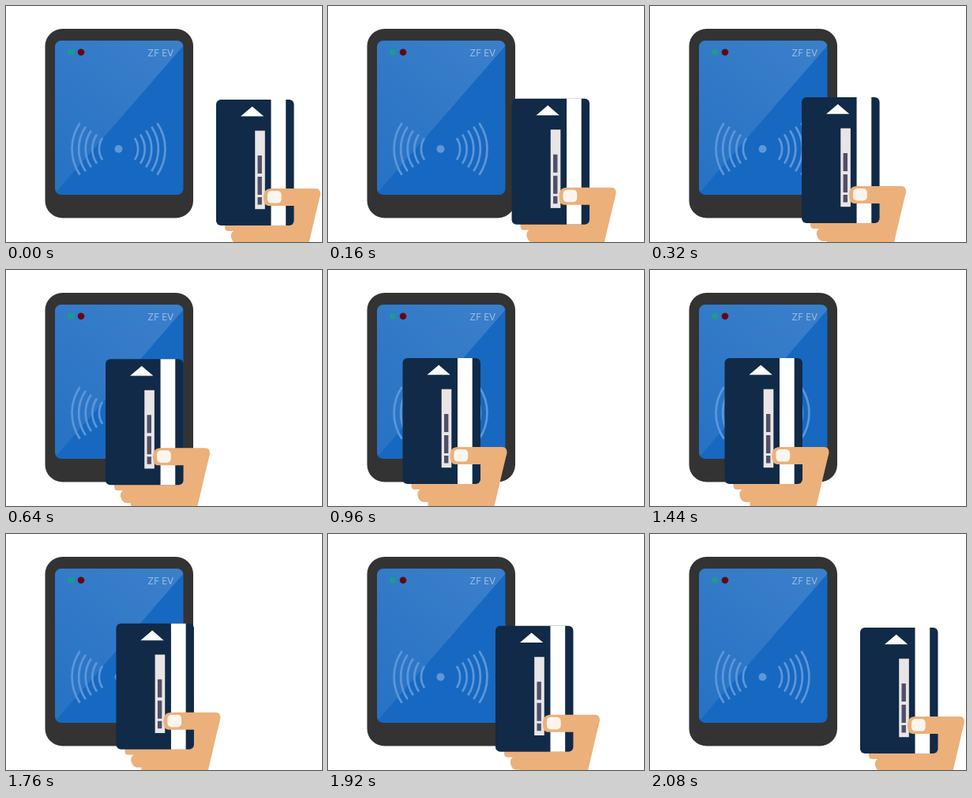
An HTML page for the animation above (3.76 s loop, 400 by 300 pixels).

```html
<!DOCTYPE html>
<html lang="en">
<head>
<meta charset="utf-8">
<title>Card reader</title>
<style>
  html, body { margin: 0; width: 100%; height: 100%; overflow: hidden; background: #fff; }
  svg { display: block; width: 400px; height: 300px; }
  .label { font: 13px "Open Sans", "Noto Sans", sans-serif; fill: #fff; fill-opacity: .5; text-anchor: end; }
  .skin { fill: #ecb07a; }
  #waves { fill: none; stroke: #5c97da; stroke-width: 2.7; }
</style>
</head>
<body>
<svg viewBox="0 0 400 300">
  <defs>
    <linearGradient id="shine" gradientUnits="userSpaceOnUse" x1="200" y1="50" x2="70" y2="225">
      <stop offset="0" stop-color="#fff" stop-opacity=".15"/>
      <stop offset="1" stop-color="#fff" stop-opacity=".07"/>
    </linearGradient>
    <clipPath id="panel"><rect x="62" y="44" width="162.5" height="196" rx="8"/></clipPath>
  </defs>

  <rect x="49.5" y="29" width="187.5" height="240.5" rx="22" fill="#333"/>
  <g clip-path="url(#panel)">
    <rect x="62" y="44" width="163" height="196" fill="#1768c0"/>
    <path d="M62 44H225V50L62 238Z" fill="url(#shine)"/>
    <rect id="flash" x="62" y="44" width="163" height="196" fill="#fff" opacity="0"/>
  </g>
  <circle id="led" cx="82" cy="58.7" r="4" fill="#1f9a8c"/>
  <circle cx="95" cy="58.7" r="4.3" fill="#680610"/>
  <text class="label" x="212" y="63.5">ZF EV</text>
  <path id="waves"/>
  <circle cx="142.5" cy="181.7" r="5" fill="#5c97da"/>

  <g id="card">
    <path class="skin" d="M277 274V281Q277 286 281 286H288Q284 289 285 294Q287 302 293 302H298V320H379L398 239L360 236V274Z"/>
    <rect x="266" y="119" width="98.5" height="160" rx="6" fill="#102a48"/>
    <rect x="335.5" y="119" width="18.7" height="160" fill="#fff"/>
    <path d="M297 140.3L311.7 127.7L326.3 140.3Z" fill="#fff"/>
    <rect x="315.2" y="158.5" width="12.6" height="99.7" fill="#e9e5e6"/>
    <path d="M318.5 190h5.4v23h-5.4zM318.5 217h5.4v23h-5.4zM318.5 243h5.4v9.5h-5.4z" fill="#4f5067"/>
    <path class="skin" d="M336 232H392Q398 232 398 239L394 254H332Q326 254 326 243Q326 232 336 232Z"/>
    <rect x="331" y="235" width="17.7" height="15.6" rx="5" fill="#fcf5ed"/>
  </g>
</svg>
<script>
  const TICK = 80, TICKS = 47;
  const SHIFT = { x: -171.5, y: -7 };
  // Share of the way travelled after each tick of the approach
  const ease = [0, .085, .195, .315, .431, .543, .646, .738, .816, .881, .934, .974, 1];
  const LAST = ease.length - 1;
  const byId = id => document.getElementById(id);
  const card = byId('card'), flash = byId('flash'), led = byId('led');

  function arcs(cx, cy) {
    const angle = 34 * Math.PI / 180;
    let d = '';
    for (const side of [-1, 1]) {
      for (let i = 0; i < 5; i++) {
        const r = 59 - 8.6 * i;
        const x = cx + side * r * Math.cos(angle), h = r * Math.sin(angle);
        d += `M${x} ${cy - h}A${r} ${r} 0 0 ${side > 0 ? 1 : 0} ${x} ${cy + h}`;
      }
    }
    return d;
  }

  // The card returns along the same path at double speed
  function pose(n) {
    return n < 20 ? Math.min(n, LAST) : Math.max(0, 11 - 2 * (n - 20));
  }

  function draw(n) {
    const p = ease[pose(n)];
    card.setAttribute('transform', `translate(${SHIFT.x * p} ${SHIFT.y * p})`);
    const lit = n === 16 || n === 17;
    flash.setAttribute('opacity', lit ? (n === 16 ? .12 : .2) : 0);
    led.setAttribute('fill', lit ? '#2fd67c' : '#1f9a8c');
  }

  byId('waves').setAttribute('d', arcs(142.5, 181.7));
  const start = performance.now();
  function frame() {
    draw(Math.floor((performance.now() - start) / TICK) % TICKS);
    requestAnimationFrame(frame);
  }
  frame();
</script>
</body>
</html>
```
